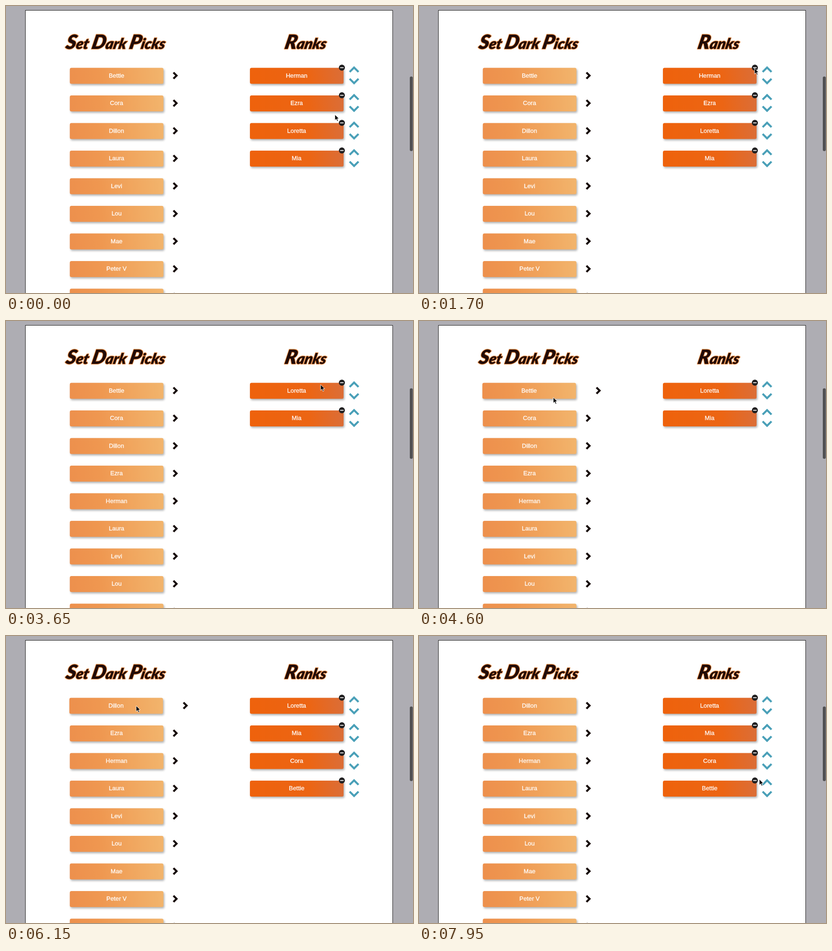
An HTML page for the animation above (8 s loop, 891x629 px).

```html
<!DOCTYPE html>
<html lang="en">
<head>
<meta charset="utf-8">
<title>Ranked picks</title>
<style>
  html, body { margin: 0; width: 100%; height: 100%; overflow: hidden; background: #aeadb3; }
  svg { display: block; }
  .label { font: 13.3px "Liberation Sans", Arial, sans-serif; fill: #fff; stroke: #fff; stroke-width: .3; text-anchor: middle; }
  .heading { font: italic 900 32px Lato, sans-serif; fill: #210b08; stroke: #e58a43; stroke-width: 2.6; stroke-linejoin: round; paint-order: stroke; text-anchor: middle; }
  .initial { font-size: 43px; }
  .button { filter: drop-shadow(2px 3px 2px rgba(0, 0, 0, .3)); }
  .chevron { fill: none; stroke-width: 4.4; }
</style>
</head>
<body>
<svg width="891" height="629" viewBox="0 0 891 629">
  <defs>
    <linearGradient id="pick" gradientUnits="userSpaceOnUse" x1="0" y1="0" x2="205" y2="-20">
      <stop offset="0" stop-color="#ed904d"/><stop offset=".3" stop-color="#ef9750"/><stop offset="1" stop-color="#f2b56d"/>
    </linearGradient>
    <linearGradient id="rank" gradientUnits="userSpaceOnUse" x1="0" y1="0" x2="205" y2="-20">
      <stop offset="0" stop-color="#ee620c"/><stop offset=".62" stop-color="#ec6514"/><stop offset="1" stop-color="#da6e39"/>
    </linearGradient>
  </defs>
  <rect x="42.5" y="9.5" width="804" height="640" fill="#fff" stroke="#1c1c1c"/>
  <g class="heading">
    <text transform="translate(238 94) skewX(-12)"><tspan class="initial">S</tspan>et <tspan class="initial">D</tspan>ark <tspan class="initial">P</tspan>icks</text>
    <text transform="translate(654 94) skewX(-12)"><tspan class="initial">R</tspan>anks</text>
  </g>
  <g id="lists"></g>
  <rect id="thumb" x="884" width="6.5" rx="3.2" fill="#505052"/>
  <path id="cursor" d="M0 0V12.5L3 9.8L5.1 14.6L7.2 13.7L5.1 9H9Z" fill="#000" stroke="#fff" stroke-width=".9"/>
</svg>
<script>
const LOOP = 8000, ROW_TOP = 135.5, ROW_STEP = 60.5;
const people = ["Bettie", "Cora", "Dillon", "Ezra", "Herman", "Laura", "Levi", "Lou", "Mae", "Peter V", "Quinn"];

// Ranked list from each moment on; "Loretta" and "Mia" stay ranked throughout.
const stages = [
  [0, ["Herman", "Ezra", "Loretta", "Mia"]],
  [2150, ["Ezra", "Loretta", "Mia"]],
  [3250, ["Loretta", "Mia"]],
  [5350, ["Loretta", "Mia", "Cora"]],
  [6030, ["Loretta", "Mia", "Cora", "Bettie"]]
];
const thumbs = { 2: [147.5, 154.5], 3: [151.5, 158.5], 4: [154.5, 163.5] };   // top, height
const hovers = [[0, 3900, 4720], [1, 4850, 5350], [0, 5720, 6550]];           // row, from, to

// time, x, y of the pointer tip
const pointerPath = [
  [0, 720, 238], [400, 756, 190], [850, 733, 146], [1200, 734.5, 136.5], [3500, 734.5, 136.5],
  [4250, 300, 165], [4600, 294, 167.5], [4700, 293, 170], [5150, 286, 206], [5520, 286, 206],
  [5850, 285, 153], [6400, 285, 153], [7050, 757, 296], [7600, 745, 314], [LOOP, 745, 314]
];

const $ = id => document.getElementById(id);
const mix = (a, b, k) => a + (b - a) * k;
const ease = k => { k = Math.min(1, Math.max(0, k)); return k * k * (3 - 2 * k); };

function pointerAt(t) {
  const i = pointerPath.findIndex(p => p[0] > t);
  const [t0, x0, y0] = pointerPath[i - 1], [t1, x1, y1] = pointerPath[i];
  const k = ease((t - t0) / (t1 - t0));
  return [mix(x0, x1, k), mix(y0, y1, k)];
}

const hoverAt = (row, t) => Math.max(0, ...hovers.filter(h => h[0] === row)
  .map(([, from, to]) => Math.min(ease((t - from) / 150), ease((to + 120 - t) / 120))));

const button = (name, fill) =>
  `<rect class="button" width="205" height="35" rx="3.5" fill="url(#${fill})"/><text class="label" x="102.3" y="21.3">${name}</text>`;

function pickRow(name, row, t) {
  const hover = hoverAt(row, t), y = ROW_TOP + row * ROW_STEP;
  return `<g transform="translate(${139.7 - hover} ${y})">${button(name, "pick")}</g>
    <path class="chevron" stroke="#160a08" transform="translate(${366.6 + 22 * hover} ${y + 17})" d="M0 -6.8L6.8 0L0 6.8"/>`;
}

function rankRow(name, row) {
  return `<g transform="translate(534 ${ROW_TOP + row * ROW_STEP})">${button(name, "rank")}
    <circle cx="201.3" cy="-.3" r="6.6" fill="#201f20"/><path d="M197.5 -.3h7.6" stroke="#fff" stroke-width="1.8"/>
    <path class="chevron" stroke="#4aa0b8" d="M218.3 9L228 -.6L237.7 9M218.3 24L228 33.6L237.7 24"/></g>`;
}

function thumbAt(t, index) {
  const now = thumbs[stages[index][1].length];
  if (!index) return now;
  const before = thumbs[stages[index - 1][1].length];
  const k = ease((t - stages[index][0]) / 120);
  return now.map((value, i) => mix(before[i], value, k));
}

function draw() {
  const t = performance.now() % LOOP;
  const index = stages.findLastIndex(stage => stage[0] <= t);
  const ranked = stages[index][1];
  const picks = people.filter(name => !ranked.includes(name)).slice(0, 9);
  $("lists").innerHTML = picks.map((name, row) => pickRow(name, row, t)).join("") + ranked.map(rankRow).join("");

  const [top, height] = thumbAt(t, index);
  $("thumb").setAttribute("y", top);
  $("thumb").setAttribute("height", height);
  $("cursor").setAttribute("transform", `translate(${pointerAt(t)})`);
  requestAnimationFrame(draw);
}
draw();
</script>
</body>
</html>
```
